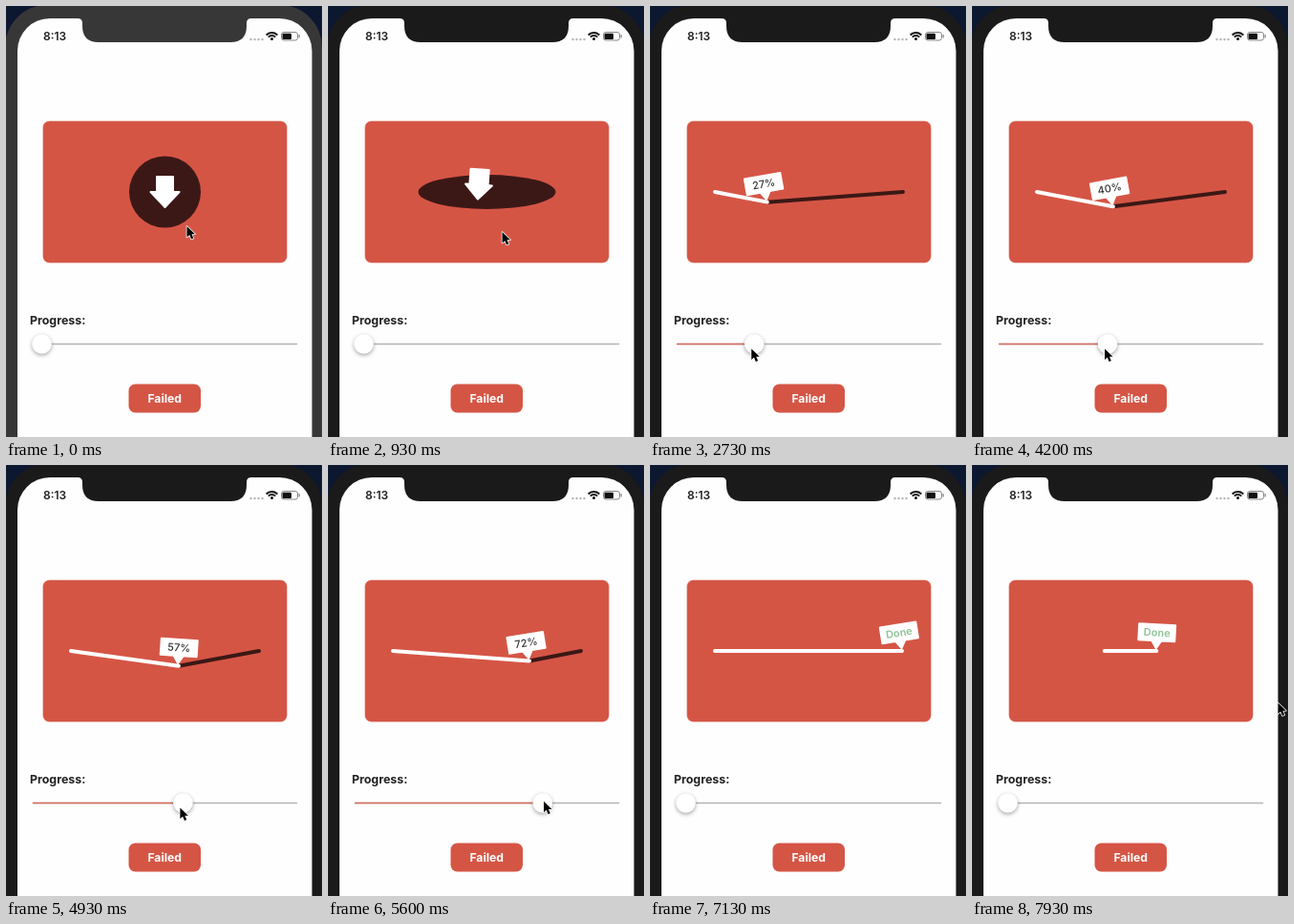
An HTML page with a canvas for the animation above (8000 ms loop, 331 by 452 pixels).

```html
<!DOCTYPE html>
<html lang="en">
<head>
<meta charset="utf-8">
<style>
  html, body { margin: 0; width: 100%; height: 100%; overflow: hidden; background: #0c1730; }
  canvas { display: block; width: 331px; height: 452px; }
</style>
</head>
<body>
<canvas></canvas>
<script>
const W = 331, H = 452, LOOP = 8000;
const RED = '#d55545', DARK = '#3b1816', FONT = 'Inter, "Open Sans", sans-serif';
const MID = { x: 166.5, y: 195 }, HALF = 98.5;

// Scene times in ms
const FOCUS = 70, MORPH = 760, LANDED = 1480, DRAG = 2430, FULL = 6600, FINISH = 6800, COLLAPSE = 7600;

const canvas = document.querySelector('canvas');
const ctx = canvas.getContext('2d');
const dpr = window.devicePixelRatio || 1;
canvas.width = W * dpr;
canvas.height = H * dpr;

const clamp = v => Math.min(1, Math.max(0, v));
const mix = (a, b, k) => a + (b - a) * k;
const span = (t, from, to) => clamp((t - from) / (to - from));
const smooth = k => k * k * (3 - 2 * k);

// The drag speeds up and slows down between a few [time, progress] stops.
const STOPS = [[DRAG, 0], [2730, .278], [4200, .405], [4930, .573], [6330, .892], [FULL, 1]];
const progress = t => STOPS.slice(1).reduce((p, [time, value], i) =>
  p + (value - STOPS[i][1]) * span(t, STOPS[i][0], time), 0);

const knobX = p => 37.5 + 258 * p;

// The label sways like a pendulum.
const sway = t => -3.2 - 7.2 * Math.cos((t - 4200) / 1540 * Math.PI * 2);

function box(x, y, w, h, r, color) {
  ctx.fillStyle = color;
  ctx.beginPath();
  ctx.roundRect(x, y, w, h, r);
  ctx.fill();
}

function disc(x, y, r, color) {
  box(x - r, y - r, r * 2, r * 2, r, color);
}

function text(str, x, y, size, weight, color, align = 'left') {
  ctx.font = `${weight} ${size}px ${FONT}`;
  ctx.textAlign = align;
  ctx.fillStyle = color;
  ctx.fillText(str, x, y);
}

function line(x0, y0, x1, y1, width, color, sag = 0) {
  ctx.strokeStyle = color;
  ctx.lineWidth = width;
  ctx.lineCap = 'round';
  ctx.beginPath();
  ctx.moveTo(x0, y0);
  ctx.quadraticCurveTo((x0 + x1) / 2, (y0 + y1) / 2 + sag * 2, x1, y1);
  ctx.stroke();
}

function drawPhone(bezel) {
  ctx.fillStyle = '#0c1730';
  ctx.fillRect(0, 0, W, H);
  box(-1, -1, 332, 520, 44, bezel);
  box(12, 13, 308.5, 500, 34, '#fefefe');
  ctx.fillStyle = bezel;
  ctx.fill(new Path2D('M75 12v1q5 0 5 5v3q0 17 17 17h138q17 0 17-17v-3q0-5 5-5v-1z'));

  text('8:13', 39, 36, 12, 600, '#222');
  for (let i = 0; i < 4; i++) disc(256.5 + i * 4, 35, 1.2, '#b5b5b5');
  ctx.strokeStyle = '#111';
  ctx.lineWidth = 2;
  ctx.lineCap = 'butt';
  for (const r of [8, 5]) {
    ctx.beginPath();
    ctx.arc(278.5, 36, r, -Math.PI * .76, -Math.PI * .24);
    ctx.stroke();
  }
  disc(278.5, 34.6, 1.5, '#111');
  ctx.lineWidth = 1;
  ctx.strokeStyle = '#888';
  ctx.beginPath();
  ctx.roundRect(288.5, 27.5, 17, 8.5, 2.5);
  ctx.stroke();
  box(289.5, 28.7, 9.5, 6.2, 1, '#111');
  box(306.5, 30, 1.3, 3.5, .6, '#888');
}

function drawSlider(p) {
  text('Progress:', 25, 333.5, 12.4, 700, '#222');
  line(28.5, 354.5, 304.5, 354.5, 1.5, '#b1b5b3');
  if (p > 0) line(28.5, 354.5, knobX(p), 354.5, 1.5, '#d9695a');
  ctx.save();
  ctx.shadowColor = 'rgba(0,0,0,.35)';
  ctx.shadowBlur = 4 * dpr;
  ctx.shadowOffsetY = 1.5 * dpr;
  disc(knobX(p), 354.5, 10.3, '#fff');
  ctx.restore();
}

// Arrow (morph 0) and label (morph 1) are one outline: a triangular tip under a rectangle.
function drawPointer(x, y, degrees, morph, { label = '', color = '#333', weight = 500, flip = 1 } = {}) {
  const tipHalf = mix(15, 5, morph), neck = mix(-16, -8, morph);
  const bodyHalf = mix(8.5, 19, morph), top = mix(-32, -25, morph);
  ctx.save();
  ctx.translate(x, y);
  ctx.rotate(degrees * Math.PI / 180);
  ctx.scale(flip, 1);
  ctx.beginPath();
  ctx.moveTo(0, 0);
  ctx.lineTo(-tipHalf, neck);
  ctx.lineTo(-bodyHalf, neck);
  ctx.lineTo(-bodyHalf, top);
  ctx.lineTo(bodyHalf, top);
  ctx.lineTo(bodyHalf, neck);
  ctx.lineTo(tipHalf, neck);
  ctx.closePath();
  ctx.fillStyle = ctx.strokeStyle = '#fff';
  ctx.lineJoin = 'round';
  ctx.lineWidth = 2;
  ctx.fill();
  ctx.stroke();
  text(label, 0, -12.6, 11, weight, color, 'center');
  ctx.restore();
}

function drawIntro(t) {
  const squash = smooth(span(t, MORPH, 1080));
  const hop = smooth(span(t, MORPH + 40, LANDED));
  const arc = Math.sin(Math.PI * hop);
  ctx.fillStyle = DARK;
  ctx.beginPath();
  ctx.ellipse(MID.x, MID.y, mix(37.5, 100, squash), mix(37.5, 2, squash), 0, 0, Math.PI * 2);
  ctx.fill();
  drawPointer(mix(MID.x, MID.x - HALF, hop), mix(211, 192.2, hop) - 22 * arc,
    14 * arc - 3 * hop, smooth(span(t, MORPH + 90, 1250)));
}

function drawLoading(t, p) {
  const left = MID.x - HALF, right = MID.x + HALF;
  const x = mix(left, right, p);
  const y = MID.y + 16.5 * Math.sin(Math.PI * clamp(p)) ** 1.65;
  const age = t - LANDED;
  const wobble = p > 0 ? 0 : 2 * Math.exp(-age / 300) * Math.cos(age / 70);
  if (p < 1) line(x, y, right, MID.y, 4, DARK, wobble);
  if (p > 0) line(left, MID.y, x, y, 4, '#fff');
  const label = t > 1620 ? Math.floor(p * 100) + '%' : '';
  drawPointer(x - .8, y - 2.8, sway(t), 1, { label });
}

function drawDone(t) {
  const half = mix(HALF, 26.5, smooth(span(t, COLLAPSE, LOOP - 40)));
  const turn = smooth(span(t, FINISH, FINISH + 350));
  const flip = Math.max(.03, Math.abs(Math.cos(Math.PI * turn)));
  const look = turn > .5
    ? { label: 'Done', color: '#8fc295', weight: 600, flip }
    : { label: '100%', flip };
  line(MID.x - half, MID.y, MID.x + half - 1, MID.y, 4, '#fff');
  drawPointer(MID.x + half - 1.5, 192.2, sway(t), 1, look);
}

// Moves to the slider, follows the knob, leaves on the right and comes back in.
function cursorAt(t, p) {
  if (t < DRAG) {
    const k = smooth(span(t, 850, LANDED));
    return [mix(189.5, 35.5, k), mix(231, 364, k)];
  }
  if (t < COLLAPSE) {
    const leave = span(t, FULL, 6780);
    const lift = smooth(span(t, 4930, 6330));
    return [knobX(p) + mix(-3, 6, lift) + 36 * leave, mix(359.5, 345, lift) - 30 * leave];
  }
  const k = span(t, COLLAPSE, 7930);
  return [mix(336, 320.5, k), mix(252, 249.5, k)];
}

function drawCursor(x, y) {
  ctx.save();
  ctx.translate(x, y);
  ctx.scale(.85, .85);
  const arrow = new Path2D('M0 0V13.5L3.2 10.7L5.4 15.8L8 14.7L5.8 9.8H10Z');
  ctx.lineJoin = 'round';
  ctx.lineWidth = 1.8;
  ctx.strokeStyle = '#fff';
  ctx.stroke(arrow);
  ctx.fillStyle = '#000';
  ctx.fill(arrow);
  ctx.restore();
}

function draw(t) {
  const p = progress(t);
  ctx.setTransform(dpr, 0, 0, dpr, 0, 0);
  drawPhone(t < FOCUS ? '#373737' : '#1a1a1a');
  box(38.5, 120.5, 256, 149, 7, '#e08a7e');
  box(39, 121, 255, 148, 6.5, RED);
  if (t < LANDED) drawIntro(t);
  else if (t < FINISH) drawLoading(t, p);
  else drawDone(t);
  drawSlider(t < FULL + 70 ? p : 0);
  box(128.5, 396.5, 75.5, 30, 7, RED);
  text('Failed', 166.2, 416, 12.2, 700, '#fff', 'center');
  drawCursor(...cursorAt(t, p));
}

const start = performance.now();
function tick() {
  draw((performance.now() - start) % LOOP);
  requestAnimationFrame(tick);
}
tick();
</script>
</body>
</html>
```
